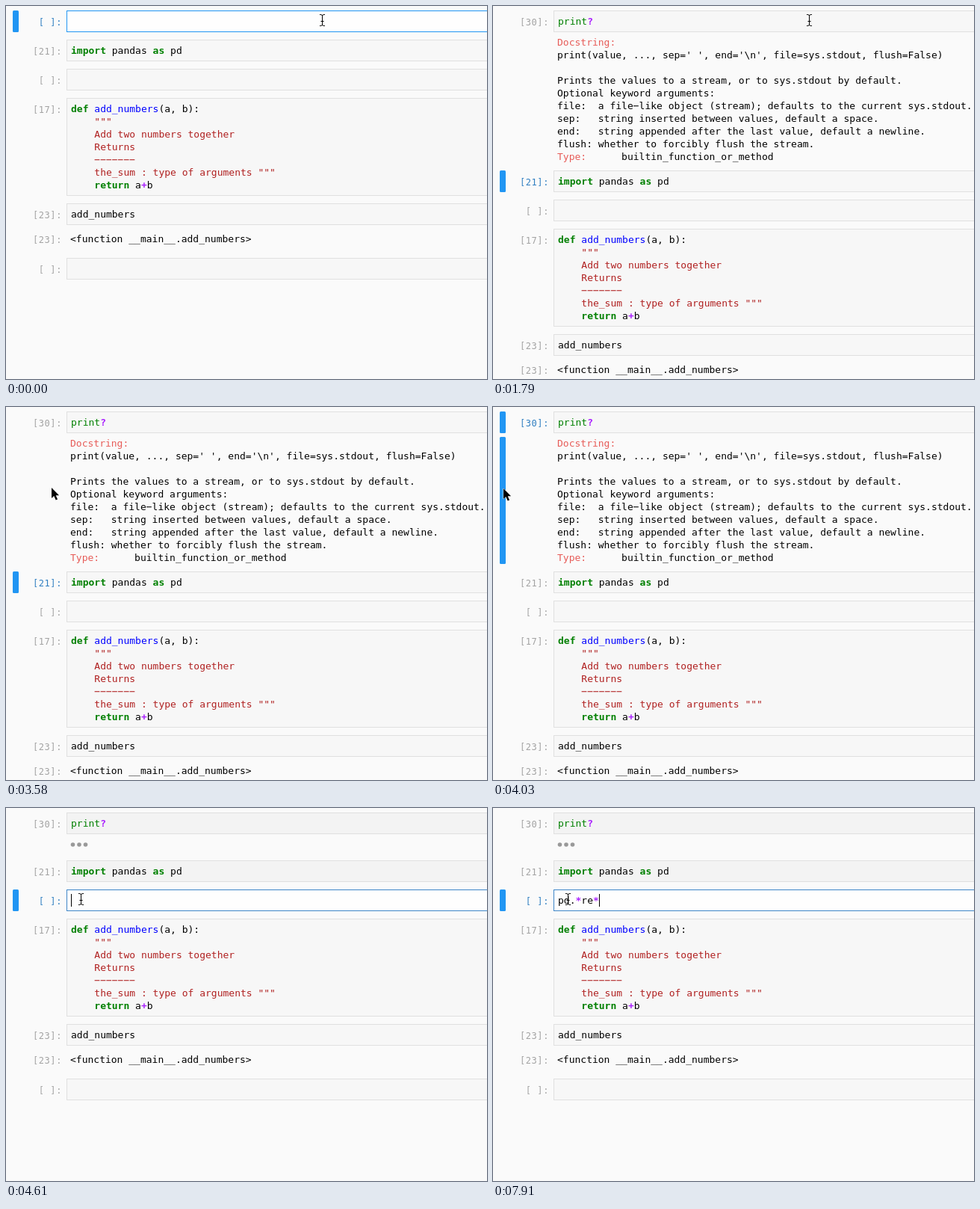
Animation of 644x499 px, one loop 8000 ms. Source, as an HTML page:

```html
<!DOCTYPE html>
<html>
<head>
<meta charset="utf-8">
<style>
html, body { margin: 0; width: 100%; height: 100%; overflow: hidden; background: #fafafa; }
svg { display: block; }
text { font: 13px "DejaVu Sans Mono", monospace; white-space: pre; fill: #000; }
.prompt { font-size: 12px; letter-spacing: .6px; text-anchor: end; fill: #a3a3a3; }
.prompt.on { fill: #307fc1; }
.key { fill: #008000; font-weight: bold; }
.builtin { fill: #008000; }
.name { fill: #00f; }
.op { fill: #a2f; font-weight: bold; }
.str { fill: #b02020; }
.head { fill: #e75c58; }
</style>
</head>
<body>
<svg id="stage" width="644" height="499"></svg>
<script>
const LOOP = 8000, LINE = 17, CHAR = 7.826;
const RUN = 1790, SELECT = 4030, COLLAPSE = 4180, EDIT = 4610;
const stage = document.getElementById('stage');

const span = (cls, s) => `<tspan class="${cls}">${s}</tspan>`;
const paint = s => s.replace(/print|[?*]/g, m => span(m === 'print' ? 'builtin' : 'op', m));

// [time, text, caret visible]
const firstInput = [
  [0, '', 0], [140, '', 1], [290, 'p', 1], [590, 'pr', 1], [740, 'prin', 1],
  [890, 'print', 1], [1340, 'print?', 1], [RUN, 'print?', 0]
];
const secondInput = [
  [0, '', 0], [EDIT, '', 1], [5210, 'p', 1], [5360, 'pd', 1], [5510, 'pd.', 1],
  [5960, 'pd.', 0], [6560, 'pd.', 1], [6710, 'pd.*', 1], [6860, 'pd.*r', 1],
  [7160, 'pd.*re', 1], [7910, 'pd.*re*', 1]
];
// [time, x, y, shape]
const pointer = [
  [0, 423, 19, 'beam'], [2390, 428, 45, 'beam'], [2540, 436, 145, 'beam'], [2690, 438, 258, 'beam'],
  [2990, 420, 240, 'beam'], [3140, 358, 228, 'beam'], [3290, 245, 180, 'beam'], [3430, 130, 135, 'beam'],
  [3580, 61, 108, 'arrow'], [3730, 36, 107, 'arrow'], [3880, 21, 108, 'arrow'], [SELECT, 14, 109, 'arrow'],
  [COLLAPSE, 20, 109, 'arrow'], [4330, 40, 128, 'arrow'], [4480, 84, 132, 'beam'], [EDIT, 100, 122, 'beam']
];
const at = (steps, t) => steps.findLast(s => s[0] <= t);

const importLine = `${span('key', 'import')} pandas ${span('key', 'as')} pd`;
const definition = [
  `${span('key', 'def')} ${span('name', 'add_numbers')}(a, b):`,
  ...['"""', 'Add two numbers together', 'Returns', '−'.repeat(7), 'the_sum : type of arguments """']
    .map(s => span('str', '    ' + s)),
  `    ${span('key', 'return')} a${span('op', '+')}b`
];
const help = [
  span('head', 'Docstring:'),
  "print(value, ..., sep=' ', end='\\n', file=sys.stdout, flush=False)",
  '',
  'Prints the values to a stream, or to sys.stdout by default.',
  'Optional keyword arguments:',
  'file:  a file−like object (stream); defaults to the current sys.stdout.',
  'sep:   string inserted between values, default a space.',
  'end:   string appended after the last value, default a newline.',
  'flush: whether to forcibly flush the stream.',
  `${span('head', 'Type:')}      builtin_function_or_method`
];

const lines = (x, y, list) =>
  list.map((s, i) => `<text x="${x}" y="${y + i * LINE}">${s}</text>`).join('');
const prompt = (y, n, on) => `<text class="prompt${on ? ' on' : ''}" x="75" y="${y}">[${n}]:</text>`;
const bar = (y, h) => `<rect x="9" y="${y}" width="8" height="${h}" rx="1.5" fill="#2196f3"/>`;

function cell(y, n, code, { on, edit, caret, fill = '#f7f7f7', blue = '#2196f3' } = {}) {
  const h = code.length * LINE + 11;
  return (on ? bar(y, h + 1) : '') + prompt(y + 20, n, on) +
    `<rect x="81.5" y="${y + .5}" width="600" height="${h}" fill="${edit ? '#fefefe' : fill}" stroke="${edit ? blue : '#e0e0e0'}"/>` +
    lines(87, y + 19, code) +
    (caret >= 0 ? `<rect x="${Math.round(87.1 + caret * CHAR)}" y="${y + 6}" width="1" height="17"/>` : '');
}

function cursor([, x, y, shape]) {
  const d = shape === 'beam'
    ? 'M-3-7.5h1.5q2 0 2 2v11q0 2-2 2H-3M4-7.5H2.5q-2 0-2 2v11q0 2 2 2H4M-1.5 1.5h4'
    : 'M0 0v14l3.2-3 2.5 5.6 2.4-1-2.4-5.4h4.4z';
  const look = shape === 'beam' ? 'fill="none" stroke="#000"' : 'stroke="#fff" paint-order="stroke"';
  return `<path transform="translate(${x} ${y})" d="${d}" ${look}/>`;
}

function scene(t) {
  const ran = t >= RUN, picked = t >= SELECT && t < EDIT, folded = t >= COLLAPSE, editing = t >= EDIT;
  const fill = editing ? '#f3f3f3' : '#f7f7f7';
  const [, one, caretOne] = at(firstInput, t);
  const [, two, caretTwo] = at(secondInput, t);
  const top = !ran ? 45 : folded ? 70 : 220;

  let out = cell(6, ran ? 30 : ' ', [paint(one)],
    { on: !ran || picked, edit: !ran, caret: caretOne ? one.length : -1, fill });
  if (picked) out += bar(40, folded ? 20 : 170);
  if (folded) out += [89.5, 98, 106.5].map(x => `<circle cx="${x}" cy="49" r="2.8" fill="#999"/>`).join('');
  else if (ran) out += lines(86, 53, help);

  out += cell(top, 21, [importLine], { on: ran && t < SELECT, fill });
  out += cell(top + 39, ' ', [paint(two)],
    { on: editing, edit: editing, caret: caretTwo ? two.length : -1, blue: '#3f86c8' });
  out += cell(top + 78, 17, definition);
  out += cell(top + 219, 23, ['add_numbers']);
  out += prompt(top + 272, 23) + lines(86, top + 271, ['&lt;function __main__.add_numbers&gt;']);
  out += cell(top + 292, ' ', ['']);
  return out + cursor(at(pointer, t));
}

let shown = '';
function draw() {
  const next = scene(performance.now() % LOOP);
  if (next !== shown) stage.innerHTML = shown = next;
  requestAnimationFrame(draw);
}
draw();
</script>
</body>
</html>
```
